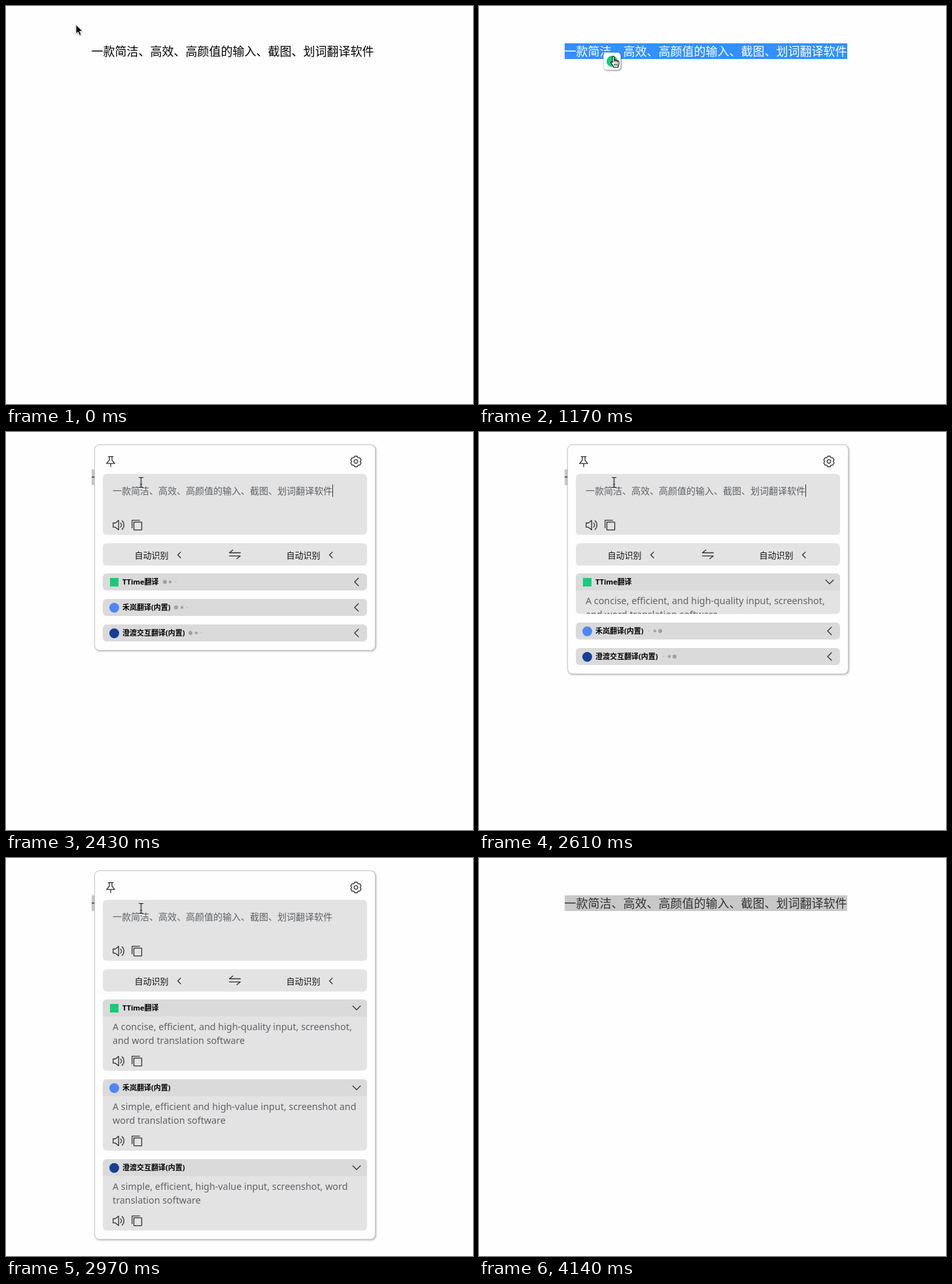
Animation, 714 px wide and 608 px high, one loop 4230 ms. Source, as an HTML page:

```html
<!DOCTYPE html>
<html lang="zh-CN">
<head>
<meta charset="utf-8">
<title>划词翻译</title>
<style>
  :root { --cjk: "Noto Sans CJK SC", "Noto Sans CJK", sans-serif; --latin: "Noto Sans", "Noto Sans CJK SC", sans-serif; }
  html, body { margin: 0; width: 100%; height: 100%; overflow: hidden; background: #fefefe; }
  body { position: relative; font-family: var(--cjk); font-weight: 350; }

  /* Everything shares one 4230 ms clock, stepping on 90 ms ticks (2.1277%). */
  .line, .word, .button, .panel, .row, .dots i, .caret, .cursor, .cursor g {
    animation: 4230ms step-end infinite;
  }

  .line {
    position: absolute; left: 131px; top: 57px; width: 432px; height: 24px; text-indent: -.5px;
    font-size: 18px; line-height: 22px; white-space: nowrap; animation-name: select;
  }
  .word { display: inline-block; height: 24px; text-indent: 0; vertical-align: top; animation-name: word; }
  @keyframes select {
    0% { background: transparent; color: #000; }
    14.89% { background: #3390ff; color: #fff; }
    57.44%, 100% { background: #c8c8c8; color: #323232; }
  }
  @keyframes word {
    0%, 14.89%, 100% { background: transparent; color: inherit; }
    12.76% { background: #3390ff; color: #fff; }
  }

  .button {
    position: absolute; left: 190px; top: 71px; width: 27px; height: 27px; box-sizing: border-box;
    border: 1px solid #d0d0d0; border-radius: 5px; background: #fff;
    box-shadow: 1px 1px 2px rgba(0, 0, 0, .4); animation-name: button;
  }
  .button::after {
    content: ""; position: absolute; left: 4px; top: 4px; width: 17px; height: 17px;
    border-radius: 50%; background: #12ce78;
  }
  @keyframes button {
    0%, 40.42%, 100% { visibility: hidden; }
    19.14% { visibility: visible; }
  }

  .panel {
    position: absolute; left: 135px; top: 19px; width: 404px; padding: 196px 12px 0;
    border: 1px solid #c6c6c6; border-radius: 8px; background: #fefefe;
    box-shadow: 1px 1px 3px rgba(0, 0, 0, .3); animation-name: panel;
  }
  @keyframes panel {
    0%, 97.87%, 100% { visibility: hidden; }
    57.44% { visibility: visible; }
  }
  .head { position: absolute; left: 0; top: 0; }
  .icon { fill: none; stroke: #303030; stroke-width: 1.3; stroke-linejoin: round; stroke-linecap: round; }
  .caret { animation-name: caret; }
  @keyframes caret {
    0%, 80.85% { opacity: 1; }
    70.21%, 93.61%, 100% { opacity: 0; }
  }

  .row {
    position: relative; height: 26px; margin-bottom: 13px; overflow: hidden;
    border-radius: 6px; background: #e3e3e3; --turn: 0deg; --dots: 1;
  }
  .row:nth-of-type(1) { animation-name: open1; }
  .row:nth-of-type(2) { animation-name: open2; }
  .row:nth-of-type(3) { animation-name: open3; }
  @keyframes open1 {
    0% { height: 26px; --turn: 0deg; --dots: 1; }
    61.70% { height: 62px; --turn: -90deg; --dots: 0; }
    63.82% { height: 96px; }
    65.95%, 100% { height: 109px; --turn: -90deg; --dots: 0; }
  }
  @keyframes open2 {
    0% { height: 26px; --turn: 0deg; --dots: 1; }
    63.82% { height: 42px; --turn: -90deg; --dots: 0; }
    65.95% { height: 69px; }
    68.08% { height: 85px; }
    70.21%, 100% { height: 109px; --turn: -90deg; --dots: 0; }
  }
  @keyframes open3 {
    0% { height: 26px; --turn: 0deg; --dots: 1; }
    63.82% { height: 46px; --turn: -90deg; --dots: 0; }
    65.95% { height: 73px; }
    68.08% { height: 89px; }
    70.21%, 100% { height: 109px; --turn: -90deg; --dots: 0; }
  }
  .row h2 {
    display: flex; align-items: center; height: 26px; margin: 0; padding-left: 30px;
    background: #dadada; font: bold 11px/26px var(--latin); color: #000; white-space: nowrap;
  }
  .mark { position: absolute; left: 10px; top: 6px; width: 15px; height: 15px; border-radius: 50%; }
  .square { left: 11px; top: 7px; width: 13px; height: 13px; border-radius: 0; }
  .chevron { position: absolute; left: 380px; top: 5px; transform: rotate(var(--turn)); }
  .dots { display: flex; gap: 3px; margin-left: 6px; opacity: var(--dots); }
  .dots i { width: 5.5px; height: 5.5px; border-radius: 50%; background: #a0a0a0; }
  .dots i:nth-child(1) { animation-name: dot1; }
  .dots i:nth-child(2) { animation-name: dot2; }
  .dots i:nth-child(3) { animation-name: dot3; }
  @keyframes dot1 { 0% { transform: scale(1); } 59.57% { transform: scale(.7); } 61.70%, 100% { transform: scale(.25); } }
  @keyframes dot2 { 0%, 61.70%, 100% { transform: scale(.7); } 59.57% { transform: scale(1); } }
  @keyframes dot3 { 0% { transform: scale(.25); } 59.57% { transform: scale(.7); } 61.70%, 100% { transform: scale(1); } }
  .row p {
    position: absolute; left: 15px; top: 31px; margin: 0;
    font: 14.3px/21px var(--latin); color: #606266; white-space: nowrap;
  }
  .tools { position: absolute; left: 15px; top: 85px; }

  .cursor { position: absolute; left: 0; top: 0; overflow: visible; animation-name: move; }
  .arrow { filter: drop-shadow(0 1px 1px rgba(0, 0, 0, .35)); }
  .cursor .arrow { animation-name: arrow; }
  .cursor .beam { animation-name: beam; }
  .cursor .hand { animation-name: hand; }
  @keyframes move {
    0% { transform: translate(107px, 28px); }
    2.12% { transform: translate(133px, 46px); }
    4.25% { transform: translate(180px, 66px); }
    6.38% { transform: translate(198px, 71px); }
    21.27% { transform: translate(201px, 75px); }
    23.40% { transform: translate(201px, 74px); }
    25.53% { transform: translate(203px, 76px); }
    27.65% { transform: translate(205px, 77px); }
    42.55% { transform: translate(206.5px, 77px); }
    80.85% { transform: translate(190px, 68px); }
    82.97% { transform: translate(150px, 44px); }
    85.10% { transform: translate(110px, 30px); }
    87.23% { transform: translate(70px, 14px); }
    89.36%, 100% { transform: translate(39px, 2px); }
  }
  @keyframes arrow {
    0%, 82.97% { visibility: visible; }
    4.25%, 91.48%, 100% { visibility: hidden; }
  }
  @keyframes beam {
    0%, 23.40%, 82.97%, 100% { visibility: hidden; }
    4.25%, 42.55% { visibility: visible; }
  }
  @keyframes hand {
    0%, 42.55%, 100% { visibility: hidden; }
    23.40% { visibility: visible; }
  }
</style>
</head>
<body>
<svg width="0" height="0" style="position:absolute">
  <symbol id="tools" viewBox="0 0 48 18">
    <path class="icon" d="M.8 6h3.4l5-4v14.4l-5-4H.8zM12 6a4 4 0 0 1 0 6.4M14.4 2.6a9 9 0 0 1 0 13.2M29.8 13.6V1.8H41.4"/>
    <rect class="icon" x="32.5" y="4.6" width="12" height="12" rx=".6"/>
  </symbol>
  <symbol id="chevron" viewBox="0 0 16 16"><path class="icon" d="M10.8 2.2 5 8l5.8 5.8"/></symbol>
</svg>

<div class="line">一款<span class="word">简洁</span>、高效、高颜值的输入、截图、划词翻译软件</div>
<div class="button"></div>

<section class="panel">
  <svg class="head" width="428" height="190" viewBox="136 20 428 190">
    <g fill="#e3e3e3">
      <rect x="148" y="64" width="404" height="93" rx="6"/>
      <rect x="148" y="170" width="404" height="34" rx="6"/>
    </g>
    <g class="icon">
      <path d="M156.3 37.6h7.6M158 37.6V43l-4.2 5.2h12.4L162 43v-5.4M160 48.2V53"/>
      <g transform="translate(535 45)">
        <path d="M-2-8H2L3.2-5.6 5.9-5.7 7.9-2.3 6.4 0 7.9 2.3 5.9 5.7 3.2 5.6 2 8H-2L-3.2 5.6-5.9 5.7-7.9 2.3-6.4 0-7.9-2.3-5.9-5.7-3.2-5.6z"/>
        <circle r="2.8"/>
      </g>
      <path d="M358.3 184.5h-16.8l5.3-4.3M341.5 189.3h16.8l-5.3 4.3M267 183.4l-4.4 4.4 4.4 4.4M499 183.4l-4.4 4.4 4.4 4.4"/>
    </g>
    <text x="163" y="95" font-size="14" fill="#606266">一款简洁、高效、高颜值的输入、截图、划词翻译软件</text>
    <rect class="caret" x="499" y="80" width="1" height="19" fill="#333"/>
    <use href="#tools" x="163" y="133" width="48" height="18"/>
    <g font-size="13" fill="#111">
      <text x="196.5" y="193">自动识别</text>
      <text x="428.5" y="193">自动识别</text>
    </g>
  </svg>

  <div class="row">
    <h2><span class="mark square" style="background:#12ce78"></span>TTime翻译<span class="dots"><i></i><i></i><i></i></span></h2>
    <svg class="chevron" width="16" height="16"><use href="#chevron"/></svg>
    <p>A concise, efficient, and high-quality input, screenshot,<br>and word translation software</p>
    <svg class="tools" width="48" height="18"><use href="#tools"/></svg>
  </div>
  <div class="row">
    <h2><span class="mark" style="background:#4f86f7"></span>禾岚翻译(内置)<span class="dots"><i></i><i></i><i></i></span></h2>
    <svg class="chevron" width="16" height="16"><use href="#chevron"/></svg>
    <p>A simple, efficient and high-value input, screenshot and<br>word translation software</p>
    <svg class="tools" width="48" height="18"><use href="#tools"/></svg>
  </div>
  <div class="row">
    <h2><span class="mark" style="background:#153f96"></span>澄渡交互翻译(内置)<span class="dots"><i></i><i></i><i></i></span></h2>
    <svg class="chevron" width="16" height="16"><use href="#chevron"/></svg>
    <p>A simple, efficient, high-value input, screenshot, word<br>translation software</p>
    <svg class="tools" width="48" height="18"><use href="#tools"/></svg>
  </div>
</section>

<svg class="cursor" width="1" height="1">
  <g class="arrow">
    <path d="M0 .5V14.5l3.2-3 2.3 5.2 2.4-1-2.3-5.1H10z" stroke="#fff" stroke-width=".9"/>
  </g>
  <g class="beam" fill="none" stroke="#111" stroke-width="1.2">
    <path d="M-3.5-7.5h2.5q1 0 1 1 0-1 1-1h2.5M0-7V7M-3.5 7.5h2.5q1 0 1-1 0 1 1 1h2.5M-1.5 3h3"/>
  </g>
  <g class="hand" fill="#fff" stroke="#000" stroke-width="1.1" stroke-linejoin="round">
    <path d="M-1 9.5V1.2a1.4 1.4 0 0 1 2.8 0V6c.4-1 2.4-.8 2.5.4.6-.8 2.3-.5 2.4.7.7-.5 2.2-.2 2.2 1.2v3.2c0 2-1.3 3-1.3 5.2H1c-.5-2-2.6-4-4.2-6.6-.8-1.4.6-2.4 2.2-.6z"/>
    <path fill="none" stroke-width=".9" d="M1.8 6v3M4.3 6.4v3M6.7 7.1v2.6M2.2 11v3.4M4.3 11v3.4M6.4 11v3.4"/>
  </g>
</svg>
</body>
</html>
```
